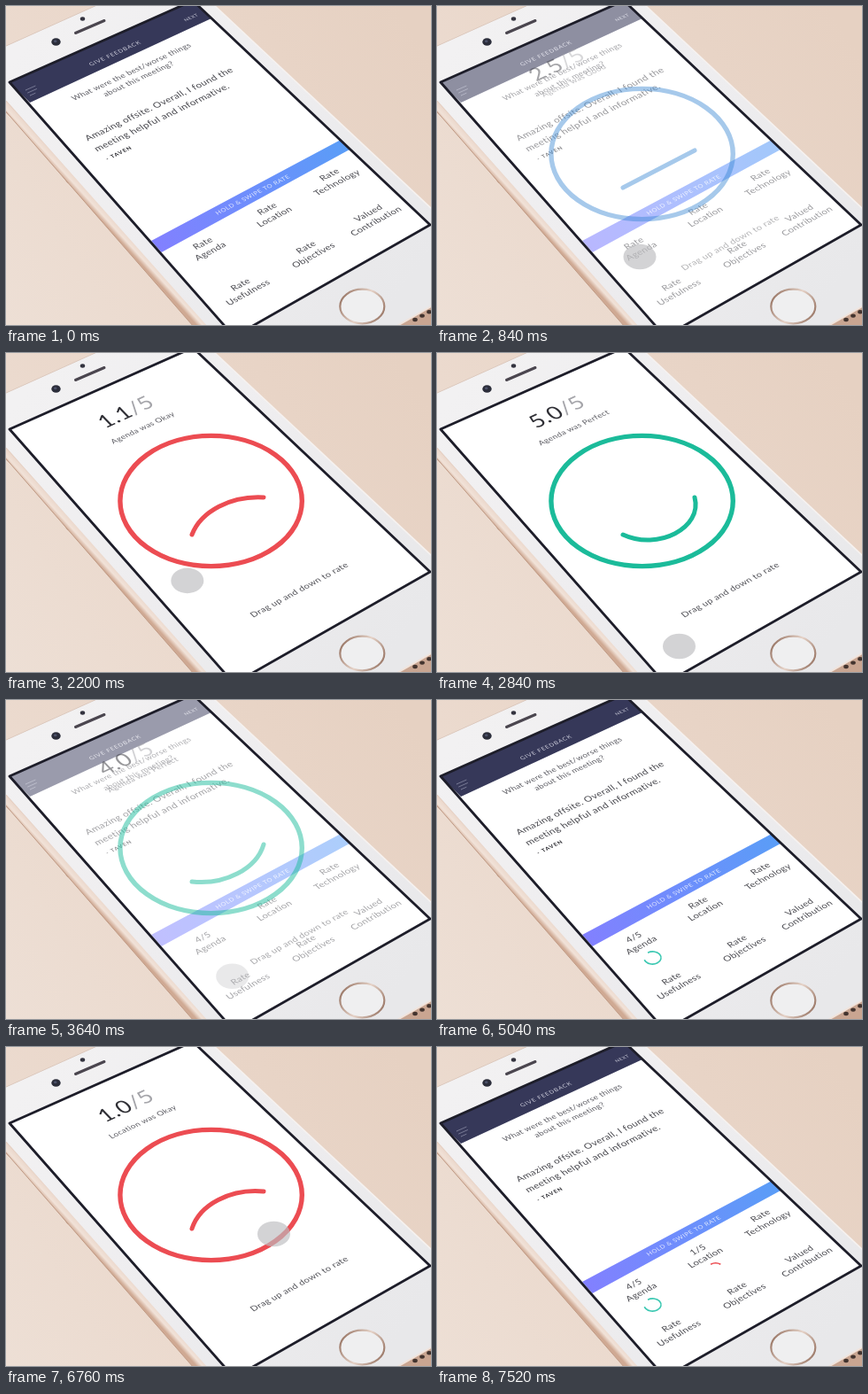
Recreate the animation shown at these times as an HTML page with a canvas. Size 480 by 360 pixels, loop 8000 ms.

```html
<!DOCTYPE html>
<html lang="en">
<head>
<meta charset="utf-8">
<title>Meeting feedback</title>
<style>
html, body { margin: 0; width: 100%; height: 100%; overflow: hidden; background: #e9d8cb; }
canvas { display: block; width: 480px; height: 360px; }
</style>
</head>
<body>
<canvas id="stage"></canvas>
<script>
const W = 480, H = 360, LOOP = 8000;
const canvas = document.getElementById('stage');
const g = canvas.getContext('2d');
const dpr = window.devicePixelRatio || 1;
canvas.width = W * dpr;
canvas.height = H * dpr;

const FONT = 'Lato, "Open Sans", sans-serif';
const SCREEN = [[4, 86], [211, -6], [479, 247], [257.5, 373]];
const RED = [236, 76, 82], BLUE = [52, 131, 208], GREEN = [27, 187, 154];
const LABELS = ['Bad', 'Okay', 'Good', 'Great', 'Perfect'];

// Vanishing points of the tilted screen: its rows and its columns.
const ROWS = [4016, -1720], COLS = [-1275, -1353];
// Screen axes near the middle of the display.
const U = [0.5625, -0.292], V = [0.386, 0.415];

const ramp = (t, a, b) => {
  const x = Math.min(1, Math.max(0, (t - a) / (b - a)));
  return x * x * (3 - 2 * x);
};
const mix = (a, b, k) => a.map((c, i) => c + (b[i] - c) * k);
const rgb = c => `rgb(${c.map(Math.round).join()})`;

function path(points) {
  g.beginPath();
  points.forEach(p => g.lineTo(...p));
}

function poly(points, fill) {
  path(points);
  g.closePath();
  g.fillStyle = fill;
  g.fill();
}

function line(points, color, width, cap = 'round') {
  path(points);
  g.strokeStyle = color;
  g.lineWidth = width;
  g.lineCap = cap;
  g.stroke();
}

function oval(x, y, rx, ry) {
  g.beginPath();
  g.ellipse(x, y, rx, ry, 0, 0, Math.PI * 2);
}

function disc(x, y, rx, ry, fill) {
  oval(x, y, rx, ry);
  g.fillStyle = fill;
  g.fill();
}

function shade(x0, y0, x1, y1, ...colors) {
  const s = g.createLinearGradient(x0, y0, x1, y1);
  colors.forEach((c, i) => s.addColorStop(i / (colors.length - 1), c));
  return s;
}

// Text lying on the screen plane; returns its advance width.
function text(str, x, y, size, color, o = {}) {
  const r = Math.atan2(ROWS[1] - y, ROWS[0] - x);
  const c = Math.atan2(y - COLS[1], x - COLS[0]);
  g.save();
  g.transform(Math.cos(r), Math.sin(r), 0.9 * Math.cos(c), 0.9 * Math.sin(c), x, y);
  g.font = `${o.weight || 400} ${size}px ${FONT}`;
  g.letterSpacing = (o.gap ?? 0.3) + 'px';
  g.textAlign = o.align || 'left';
  g.textBaseline = o.base || 'alphabetic';
  g.fillStyle = color;
  g.fillText(str, o.dx || 0, 0);
  const width = g.measureText(str).width;
  g.restore();
  return width;
}

const centered = (str, x, y, size, color, gap) =>
  text(str, x, y, size, color, { align: 'center', base: 'middle', gap });

function drawPhone() {
  g.fillStyle = shade(0, 360, 480, 60, '#eddfd5', '#ead7ca', '#e6d1c2');
  g.fillRect(0, 0, W, H);

  // Buttons, then the metal side that covers their inner half
  for (const b of [[[-3, 112], [5, 121]], [[23, 138], [43, 163]], [[51, 169], [71, 197]]]) {
    line(b, '#b9917b', 6);
    line(b, '#f0dfd4', 4);
  }
  poly([[-2, 100], [-2, 117], [212, 362], [232, 362]],
    shade(97, 230, 108, 220, '#cfa993', '#f1e2d8', '#ecd9cd', '#c9a48f'));
  line([[-2, 117], [212, 362]], '#bf9a85', 1);

  // Front glass
  poly([[-2, 46], [105, -2], [234, -2], [482, 230], [482, 338], [440, 362], [228, 362], [-2, 104]],
    shade(40, 20, 440, 330, '#f2f1f2', '#eeedef', '#e8e8ea'));
  line([[-2, 46], [105, -2]], '#dcc8bc', 1);
  line([[234, -2], [482, 230]], '#f6f2f0', 1.5);
  poly([[440, 362], [482, 338], [482, 362]], '#c9a591');
  line([[440, 362], [482, 338]], '#f1e4dc', 2);
  for (const x of [462, 470, 478]) disc(x, 354 - (x - 462) * 0.55, 2.8, 2.2, '#43342f');

  disc(56.5, 40.5, 5.2, 4.3, '#2b2d3a');
  disc(55.7, 39.7, 1.8, 1.5, '#4b5068');
  disc(86.5, 14.5, 2.7, 2.2, '#34343f');
  line([[78.5, 30.5], [111, 16.5]], '#4b464f', 3);

  disc(402.3, 339, 25, 19.3, '#efeff0');
  oval(402.3, 339, 25, 19.3);
  g.strokeStyle = shade(378, 325, 427, 353, '#94705f', '#e6d3c8', '#94705f');
  g.lineWidth = 2.2;
  g.stroke();
}

function drawTile(top, name, x, y) {
  centered(top, x - 8.5, y - 9, 10.7, '#4a4a50', 0.25);
  centered(name, x, y, 10.7, '#4a4a50', 0.25);
}

function drawRing(x, y, share, color) {
  if (share <= 0) return;
  g.save();
  g.transform(...U, ...V, x, y);
  g.beginPath();
  g.arc(0, 0, 14, -Math.PI / 2, -Math.PI / 2 + share * Math.PI * 2);
  g.restore();
  g.strokeStyle = rgb(color);
  g.lineWidth = 1.6;
  g.lineCap = 'butt';
  g.stroke();
}

function drawHome(t) {
  poly(SCREEN, '#fff');
  poly([[4, 86], [27, 109], [232, 14], [211, -6]], '#363859');
  for (const [x, y, w] of [[22, 95, 11], [24.5, 98, 10], [27, 101, 6]]) {
    line([[x, y], [x + w, y - w * 0.44]], '#777994', 1);
  }
  text('GIVE FEEDBACK', 96, 68, 6.9, '#cfcfdd', { gap: 0.8 });
  text('NEXT', 203, 17.5, 5.6, '#cfcfdd', { gap: 0.5 });

  text('What were the best/worse things', 77, 107, 9.3, '#5b5b62');
  text('about this meeting?', 112.5, 102.5, 9.3, '#5b5b62');
  text('Amazing offsite. Overall, I found the', 92.5, 152.5, 10.9, '#46464c');
  text('meeting helpful and informative.', 103, 164.5, 11.1, '#46464c');
  text('- TAVEN', 114.5, 174.5, 6.5, '#26262c', { weight: 700, gap: 1 });

  poly([[164, 265], [377, 151.5], [388, 162], [175.5, 278]], shade(168, 270, 384, 157, '#8280ff', '#6e8efc', '#5a9df7'));
  text('HOLD & SWIPE TO RATE', 239, 236, 7.3, 'rgba(255,255,255,.8)', { gap: 0.5 });

  drawTile(t > 3400 ? '4/5' : 'Rate', 'Agenda', 231, 277);
  drawTile(t > 6850 ? '1/5' : 'Rate', 'Location', 303.5, 238);
  drawTile('Rate', 'Technology', 374, 199.5);
  drawTile('Rate', 'Usefulness', 273.5, 323.5);
  drawTile('Rate', 'Objectives', 347.5, 281.5);
  drawTile('Valued', 'Contribution', 418, 243);

  drawRing(243.5, 291, 0.8 * ramp(t, 3980, 4640), [60, 200, 178]);
  drawRing(314.5, 251, 0.2 * ramp(t, 7320, 7520), RED);
}

function moodColor(v) {
  return rgb(v < 2.5 ? mix(RED, BLUE, ramp(v, 1.2, 2.3)) : mix(BLUE, GREEN, ramp(v, 2.7, 4)));
}

function drawRating(topic, v) {
  poly(SCREEN, '#fff');
  const score = v.toFixed(1);
  const dx = text(score, 112, 85.5, 25.5, '#2f2f35');
  text('/5', 112, 85.5, 25.5, '#a5a5aa', { dx });
  centered(`${topic} was ${LABELS[Math.min(4, Math.floor(v))]}`, 154.5, 84.5, 9.3, '#5b5b62');
  centered('Drag up and down to rate', 331.5, 267.5, 10.3, '#505056');

  g.strokeStyle = moodColor(v);
  g.lineWidth = 5.4;
  g.lineCap = 'round';
  oval(231.6, 167, 102.7, 73.6);
  g.stroke();

  // Mouth: an arc on a fixed chord whose depth follows the score
  const half = 72, k = 19 * (v - 2.5) / half;
  const hx = half * 2 / 3 * (1 - k * k), hy = half * 4 / 3 * k;
  g.save();
  g.transform(...U, ...V, 250.5, 184);
  g.beginPath();
  g.moveTo(-half, 0);
  g.bezierCurveTo(hx - half, hy, half - hx, hy, half, 0);
  g.restore();
  g.lineWidth = 5;
  g.stroke();
}

function draw(t) {
  const first = t < 4500;
  const v = first
    ? 2.5 - 1.5 * ramp(t, 1330, 1920) + 4 * ramp(t, 2120, 2840) - ramp(t, 3040, 3400)
    : 2.5 - 1.5 * ramp(t, 6010, 6840);
  const leave = ramp(t, 3440, 3840) + ramp(t, 6880, 7320);
  const rating = ramp(t, 640, 1080) + ramp(t, 5080, 5480) - leave;
  const touch = ramp(t, 400, 640) + ramp(t, 5040, 5200) - leave;

  g.setTransform(dpr, 0, 0, dpr, 0, 0);
  drawPhone();

  g.save();
  path(SCREEN);
  g.closePath();
  g.clip();
  drawHome(t);
  if (rating > 0) {
    g.globalAlpha = rating;
    drawRating(first ? 'Agenda' : 'Location', v);
  }
  if (touch > 0) {
    g.globalAlpha = touch;
    const [x, y] = first ? [229, 283] : [328.5, 239];
    disc(x + (v - 2.5) * 17.8, y + (v - 2.5) * 19.2, 18.5, 14.3, 'rgba(188,188,191,.66)');
  }
  g.restore();

  line([...SCREEN, SCREEN[0]], '#1d1d29', 2.8);
}

function frame(now) {
  draw(now % LOOP);
  requestAnimationFrame(frame);
}
draw(0);
requestAnimationFrame(frame);
</script>
</body>
</html>
```
